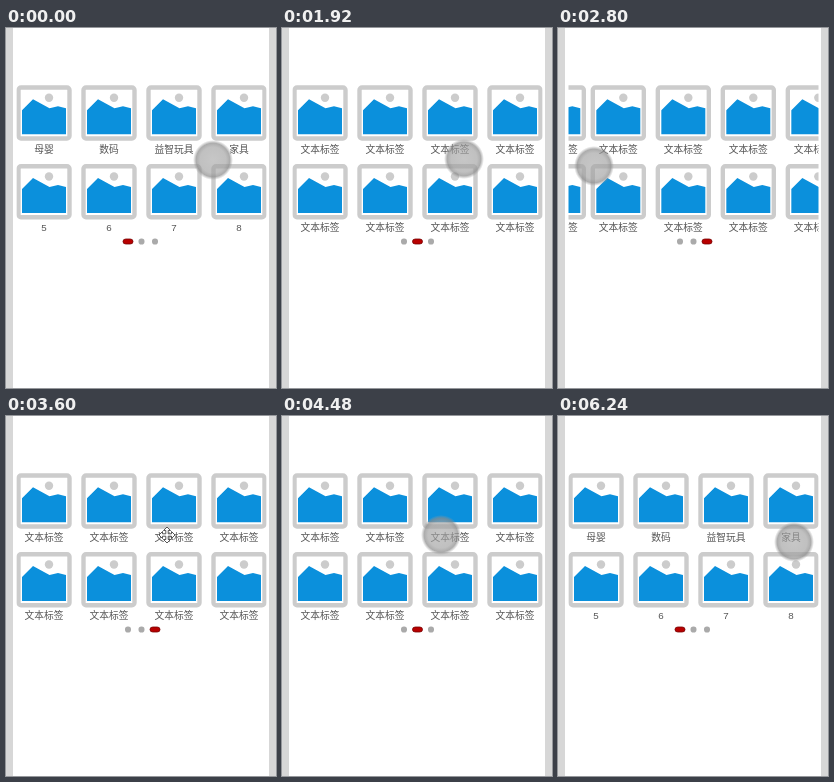
Recreate the animation shown at these times as an HTML page. Size 270 by 360 pixels, loop 6.32 s.

```html
<!DOCTYPE html>
<html lang="zh-CN">
<head>
<meta charset="utf-8">
<title>分页图标滑动</title>
<style>
  html, body { margin: 0; width: 100%; height: 100%; overflow: hidden; background: #fff; }
  svg { display: block; width: 270px; height: 360px; }
  text {
    font: 9.75px "Liberation Sans", "Noto Sans CJK SC", "Noto Sans CJK", sans-serif;
    fill: #555;
    text-anchor: middle;
  }
  .dot { fill: #aaa; }
  .dot.active { fill: #b80000; stroke: #700; stroke-width: .8; }
</style>
</head>
<body>
<svg viewBox="0 0 270 360">
  <defs>
    <clipPath id="view"><rect x="10.5" y="50" width="250" height="160"/></clipPath>
    <radialGradient id="touch">
      <stop offset="0" stop-color="#a4a4a4" stop-opacity=".62"/>
      <stop offset=".65" stop-color="#a0a0a0" stop-opacity=".66"/>
      <stop offset=".84" stop-color="#8c8c8c" stop-opacity=".72"/>
      <stop offset="1" stop-color="#999" stop-opacity="0"/>
    </radialGradient>
    <g id="card">
      <rect x="2" y="2" width="51" height="51" rx="2.5" fill="#fff" stroke="#ccc" stroke-width="4.4"/>
      <circle cx="32.5" cy="12.3" r="4.2" fill="#ccc"/>
      <path d="M5.5 24.7 16.5 13.8 33 22.8 41.5 20.8 49.5 22.7V48.7H5.5Z" fill="#0b90dc"/>
    </g>
  </defs>
  <path d="M0 0H7V360H0ZM263 0H270V360H263Z" fill="#d7d7d7"/>
  <g clip-path="url(#view)"><g id="track"></g></g>
  <g id="dots"></g>
  <g id="pointer">
    <circle id="disc" r="20" fill="url(#touch)"/>
    <path id="cross" d="M0-8 3.5-4.5H1.2V-1.2H4.5V-3.5L8 0 4.5 3.5V1.2H1.2V4.5H3.5L0 8-3.5 4.5H-1.2V1.2H-4.5V3.5L-8 0-4.5-3.5V-1.2H-1.2V-4.5H-3.5Z"
      fill="#fff" stroke="#444" stroke-width=".9"/>
  </g>
</svg>
<script>
const TICK = 80, TICKS = 79, PAGE = 255, PAGES = 3;
const $ = id => document.getElementById(id);

function add(parent, tag, attrs, text) {
  const el = document.createElementNS('http://www.w3.org/2000/svg', tag);
  for (const key in attrs) el.setAttribute(key, attrs[key]);
  if (text) el.textContent = text;
  return parent.appendChild(el);
}

const firstPage = ['母婴', '数码', '益智玩具', '家具', '5', '6', '7', '8'];
const dots = [];
for (let page = 0; page < PAGES; page++) {
  firstPage.forEach((name, i) => {
    const x = 10.5 + page * PAGE + i % 4 * 65;
    const y = 57.5 + Math.floor(i / 4) * 78.7;
    add($('track'), 'use', { href: '#card', x, y });
    add($('track'), 'text', { x: x + 27.5, y: y + 67 }, page ? '文本标签' : name);
  });
  dots.push(add($('dots'), 'rect', { rx: 2.8 }));
}

// Times are in ticks
const swipes = [
  { start: 12, length: 6.64, pages: 1 },
  { start: 31.5, length: 4.28, pages: 1 },
  { start: 50, length: 6, pages: -1 },
  { start: 70, length: 7, pages: -1 }
];
const stops = [
  { at: 0, x: 207, y: 132 },
  { at: 10, x: 246, y: 134 },
  { at: 14, x: 71, y: 147 },
  { at: 24, x: 182, y: 131 },
  { at: 31, x: 248, y: 131 },
  { at: 35, x: 36, y: 138 },
  { at: 45, x: 161, y: 119 },
  { at: 49, x: 50, y: 124 },
  { at: 56, x: 159, y: 119 },
  { at: 69, x: 50, y: 130 },
  { at: 78, x: 236, y: 126 },
  { at: TICKS, x: 207, y: 132 }
];

function ease(tick, start, length) {
  const p = Math.min(1, Math.max(0, (tick - start) / length));
  return p * p * (3 - 2 * p);
}

function pointerAt(tick) {
  const next = stops.findIndex(stop => stop.at > tick);
  const a = stops[next - 1], b = stops[next];
  const p = ease(tick, a.at, b.at - a.at);
  return { x: a.x + (b.x - a.x) * p, y: a.y + (b.y - a.y) * p };
}

function draw() {
  const tick = Math.floor(performance.now() / TICK + 0.01) % TICKS;
  const position = swipes.reduce((sum, s) => sum + s.pages * ease(tick, s.start, s.length), 0);
  const { x, y } = pointerAt(tick);
  const hovering = tick >= 43 && tick < 47;

  $('track').setAttribute('transform', `translate(${-position * PAGE})`);
  $('pointer').setAttribute('transform', `translate(${x} ${y})`);
  $('disc').style.display = hovering ? 'none' : '';
  $('cross').style.display = hovering ? '' : 'none';
  dots.forEach((dot, i) => {
    const active = i === Math.round(position);
    const width = active ? 10 : 6, height = active ? 5 : 6;
    dot.setAttribute('class', active ? 'dot active' : 'dot');
    dot.setAttribute('x', 122 + i * 13.5 - width / 2);
    dot.setAttribute('y', 213.5 - height / 2);
    dot.setAttribute('width', width);
    dot.setAttribute('height', height);
  });
  requestAnimationFrame(draw);
}
draw();
</script>
</body>
</html>
```
